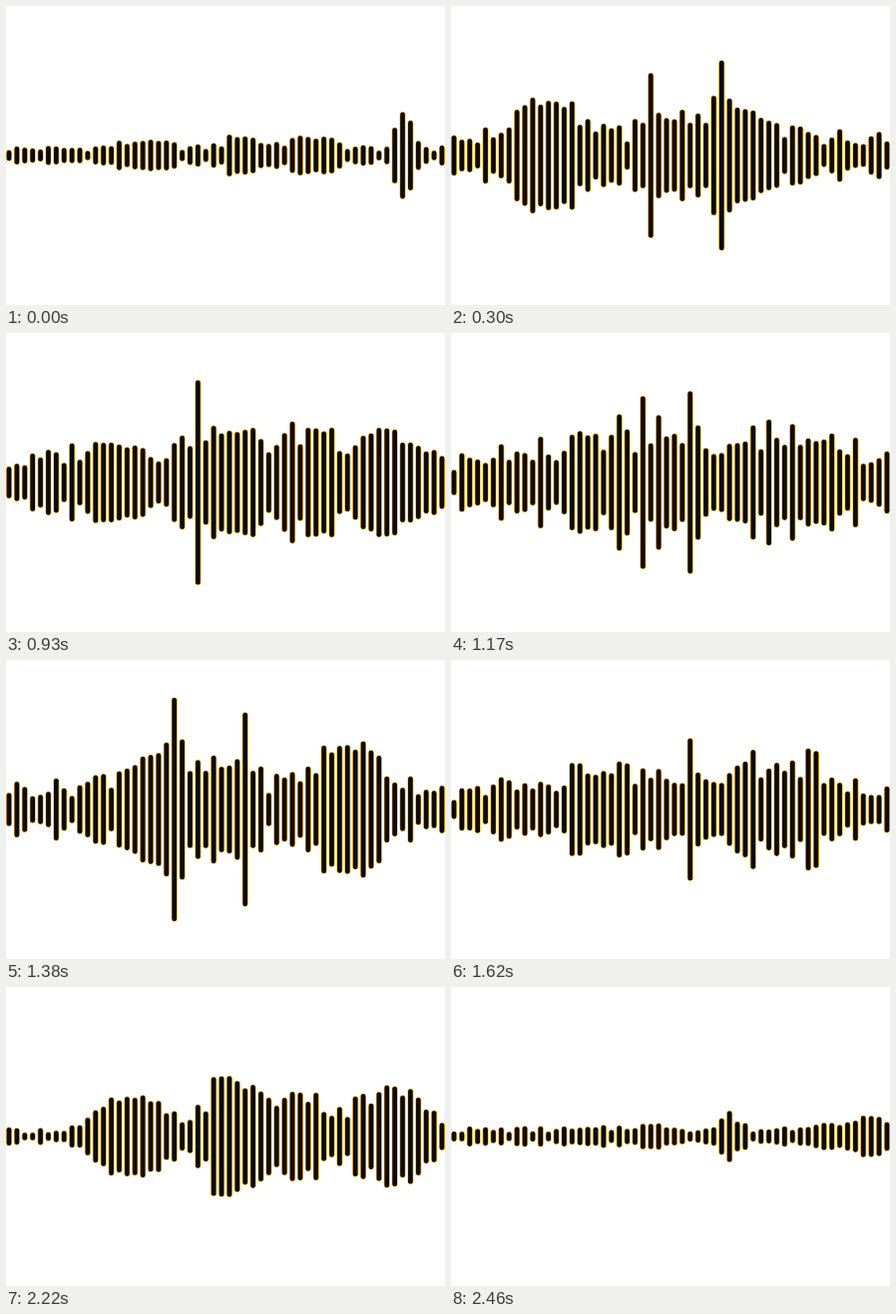
An HTML page with a canvas that plays this animation: 440 px wide and 300 px high, repeating every 2.49 s.

```html
<!DOCTYPE html>
<html lang="en">
<head>
<meta charset="utf-8">
<title>Sound wave</title>
<style>
  html, body { margin: 0; width: 100%; height: 100%; overflow: hidden; background: #fff; }
  canvas { display: block; }
</style>
</head>
<body>
<canvas id="stage" width="440" height="300"></canvas>
<script>
const ctx = document.getElementById('stage').getContext('2d');
const LOOP = 2490, STEP = 30, BARS = 56, MID = 150;
const bars = fn => Array.from({ length: BARS }, (_, i) => fn(i));
const barX = i => 3 + i * 7.89;

// Repeatable noise in 0..1
function rand(a, b) {
  const v = Math.sin(a * 12.9898 + b * 78.233) * 43758.5453;
  return v - Math.floor(v);
}

// Half-heights: a base level plus swells, roughened away from their crests
function wave(seed, base, ...swells) {
  return bars(i => {
    let level = base, crest = 0;
    for (const [centre, width, height] of swells) {
      const g = Math.exp(-(((i - centre) / width) ** 2) / 2);
      level += height * g;
      crest = Math.max(crest, g);
    }
    const rough = (rand(i, seed) - 0.54) * 0.8;
    return level * (1 + rough * (1 - crest ** 6));
  });
}

const peak = wave(4, 23, [18, 4, 32], [21, 0.5, 64], [28, 3, 20], [30, 0.5, 58], [43, 4, 42]);
const burst = [...peak].reverse().map(h => h * 0.85);

const poses = [
  [0, wave(1, 8, [17, 3, 7], [29.5, 2, 12], [38, 3, 11], [50.4, 1, 34])],
  [300, burst],
  [600, wave(2, 16, [9, 4, 7], [28, 0.9, 14], [33, 2.5, 48], [45, 3, 6])],
  [930, wave(3, 20, [13, 5, 20], [24, 0.5, 58], [28, 5, 32], [39, 3, 30], [47.5, 3.5, 35])],
  [1380, peak],
  [1860, wave(5, 14, [5, 2, 11], [15.5, 2, 22], [37.5, 3, 38], [45.4, 0.8, 68], [51, 3, 9])],
  [2220, wave(6, 7, [15.5, 3.5, 33], [28, 3, 52], [36.5, 3.5, 36], [48.5, 3.5, 44])],
  [2460, wave(7, 8, [25, 3, 5], [35, 1, 18], [47, 3, 6], [53, 1.2, 12])]
];

function heightAt(i, t) {
  const k = Math.max(1, poses.findIndex(p => p[0] >= t));
  const [t0, a] = poses[k - 1], [t1, b] = poses[k];
  const u = (t - t0) / (t1 - t0);
  const ease = (1 - Math.cos(Math.PI * u)) / 2;
  const flutter = Math.sin(t / 38 + rand(i, 9) * 6.28) * Math.sin(Math.PI * u);
  return Math.max(3, (a[i] + (b[i] - a[i]) * ease) * (1 + 0.25 * flutter));
}

function bar(x, half, width, color) {
  const reach = Math.max(0.1, half - width / 2);
  ctx.strokeStyle = color;
  ctx.lineWidth = width;
  ctx.beginPath();
  ctx.moveTo(x, MID - reach);
  ctx.lineTo(x, MID + reach);
  ctx.stroke();
}

function draw(t) {
  ctx.fillStyle = '#fff';
  ctx.fillRect(0, 0, 440, 300);
  ctx.lineCap = 'round';
  const halves = bars(i => heightAt(i, t));
  halves.forEach((h, i) => bar(barX(i), h, 6, '#ffbc1c'));
  halves.forEach((h, i) => bar(barX(i), h - 0.4, 4.7, '#0e0a06'));
}

const start = performance.now();
function tick() {
  const t = (performance.now() - start) % LOOP;
  draw(Math.floor(t / STEP) * STEP);
  requestAnimationFrame(tick);
}
tick();
</script>
</body>
</html>
```
